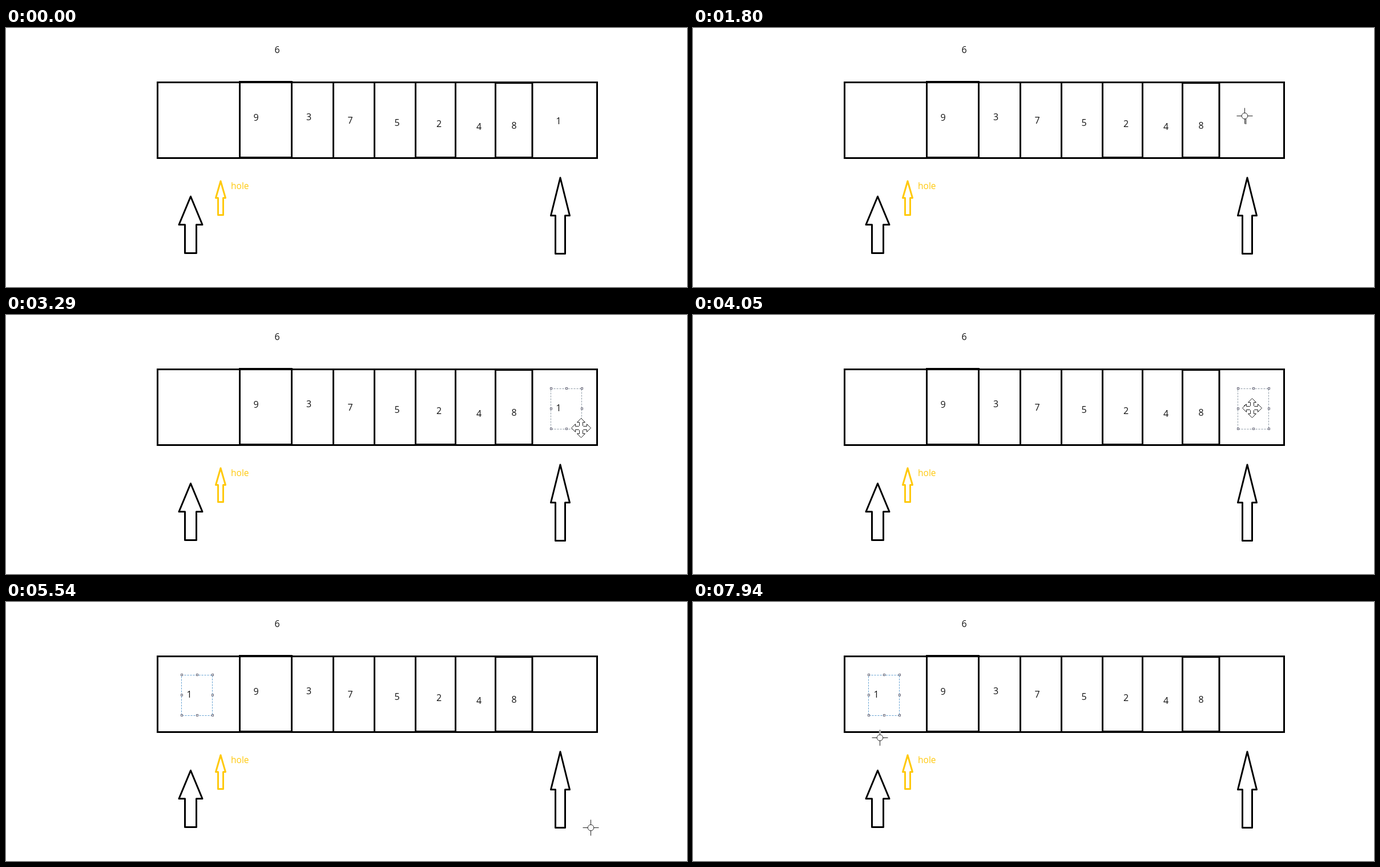
Recreate the animation shown at these times as an HTML page. Size 1193 by 455 pixels, loop 8 s.

```html
<!DOCTYPE html>
<html lang="en">
<head>
<meta charset="utf-8">
<title>Filling the hole</title>
<style>
  html, body { margin: 0; width: 100%; height: 100%; overflow: hidden; background: #fff; }
  svg { display: block; width: 100%; height: 100%; }
  text { font: 16px "Open Sans", "Noto Sans", sans-serif; text-anchor: middle; fill: #111; }
  .ink { fill: none; stroke: #000; stroke-width: 3; stroke-linejoin: round; }
  .thin { fill: #fff; stroke: #222; stroke-width: 1; }
</style>
</head>
<body>
<svg viewBox="0 0 1193 455">
  <g class="ink">
    <g stroke-linejoin="miter">
      <path d="M265.5 95.5H1035.5V228.5H265.5Z"/>
      <path d="M409.5 94.5H500.5V227.5H409.5Z"/>
      <path d="M573.5 95V228M645.5 95V228"/>
      <path d="M717.5 95V227.5H787.5V95"/>
      <path d="M857.5 96.5H922V227.5H857.5Z"/>
    </g>
    <path id="left"/>
    <path id="right"/>
    <path id="hole" stroke="#ffc90e"/>
  </g>
  <g id="digits"></g>
  <text x="394" y="283" style="font-size:15.5px;text-anchor:start;fill:#ffc90e">hole</text>

  <g id="piece">
    <rect id="paper" x="955" y="129" width="54" height="71" fill="#fff"/>
    <text x="968" y="168.7">1</text>
    <rect id="frame" x="954.5" y="129.5" fill="none" stroke-dasharray="3 2"/>
    <g id="handles" fill="#fff" stroke="#667"></g>
  </g>

  <circle id="glow" r="18" fill="#fffb78" style="mix-blend-mode:multiply"/>
  <g id="cross">
    <path id="halo" d="M0-14V14M-14 0H14" stroke="#fff" stroke-width="3"/>
    <circle r="5.3" class="thin"/>
    <path class="thin" d="M0-14V-5M0 5V14M-14 0H-5M5 0H14"/>
  </g>
  <path id="move" class="thin"/>
</svg>
<script>
const LOOP = 8000, STEP = 1000 / 15;
const SEL = { x: 955, y: 129, w: 54, h: 71 };
const GRAB = { x: 979, y: 163 }, DROPPED = { x: 332, y: 162 };
const ENTER = 260, PRESS = 2260, RELEASE = 2990, PICK = 4330, DROP = 5060;

// turning points of the cursor: time, x, y
const PATH = [
  [ENTER, 1023, 432], [1030, 518, 238], [1467, 1022, 200], [1800, 966, 154],
  [2000, 960, 128], [PRESS, 955, 130], [2667, 977, 186], [RELEASE, 1021, 209],
  [3850, 965, 163], [4000, GRAB.x, GRAB.y], [PICK, GRAB.x, GRAB.y],
  [4867, DROPPED.x, DROPPED.y], [5000, DROPPED.x, DROPPED.y],
  [5400, 1077, 414], [5533, 1024, 396], [5860, 1015, 331],
  [6320, 583, 268], [6450, 583, 268], [6733, 299, 255],
  [7067, 939, 307], [7133, 939, 307], [7400, 995, 296], [7933, 327, 238]
];

const $ = id => document.getElementById(id);
const show = (el, on) => el.setAttribute("display", on ? "inline" : "none");
const place = (el, x, y) => el.setAttribute("transform", `translate(${x} ${y})`);
const clamp = (v, max) => Math.max(0, Math.min(max, v));

function arrow(id, cx, top, headW, neck, stemW, bottom) {
  const h = headW / 2, s = stemW / 2;
  $(id).setAttribute("d", `M${cx} ${top}L${cx + h} ${neck}H${cx + s}V${bottom}H${cx - s}V${neck}H${cx - h}Z`);
}
arrow("left", 323.5, 296, 41, 345.5, 20, 395.5);
arrow("right", 971, 263, 33, 329.5, 17, 396.5);
arrow("hole", 376, 269, 17, 298.5, 9, 328.5);

// four-headed arrow: one arm turned by quarters
const arm = [[-3, -4], [-3, -10], [-7, -10], [0, -17], [7, -10], [3, -10], [3, -4]];
let points = [];
for (let i = 0, pts = arm; i < 4; i++, pts = pts.map(([x, y]) => [-y, x])) points.push(...pts);
$("move").setAttribute("d", `M${points.join("L")}Z`);

$("digits").innerHTML = [
  [6, 475, 38], [9, 438, 157], [3, 530.5, 156.5], [7, 603, 162], [5, 685, 166],
  [2, 758.5, 168.5], [4, 828.5, 173.5], [8, 890, 171]
].map(([n, x, y]) => `<text x="${x}" y="${y + 5.7}">${n}</text>`).join("");

for (let i = 0; i < 9; i++) {
  if (i === 4) continue;
  const x = SEL.x + (i % 3) * SEL.w / 2 - 1.5, y = SEL.y + Math.floor(i / 3) * SEL.h / 2 - 1.5;
  $("handles").innerHTML += `<rect x="${x}" y="${y}" width="3" height="3"/>`;
}

function cursorAt(t) {
  let i = 0;
  while (i < PATH.length - 2 && t > PATH[i + 1][0]) i++;
  const [t0, x0, y0] = PATH[i], [t1, x1, y1] = PATH[i + 1];
  const k = clamp((t - t0) / (t1 - t0), 1), e = k * k * (3 - 2 * k);
  return { x: Math.round(x0 + (x1 - x0) * e), y: Math.round(y0 + (y1 - y0) * e) };
}

function draw(time) {
  const t = Math.floor(time / STEP + 0.15) * STEP;
  const c = cursorAt(t);
  const selecting = t >= PRESS && t < RELEASE, selected = t >= RELEASE;
  const lifted = t >= PICK, dragging = lifted && t < DROP;
  const pressed = selecting || dragging;

  const at = !lifted ? GRAB : dragging ? c : DROPPED;
  const dx = at.x - GRAB.x, dy = at.y - GRAB.y;
  place($("piece"), dx, dy);
  show($("paper"), lifted);
  show($("handles"), selected);

  const frame = $("frame");
  show(frame, selecting || selected);
  frame.setAttribute("width", selected ? SEL.w : clamp(c.x - SEL.x, SEL.w));
  frame.setAttribute("height", selected ? SEL.h : clamp(c.y - SEL.y, SEL.h));
  frame.setAttribute("stroke", selecting ? "#222" : lifted ? "#62a0d2" : "#8e9aa6");

  const left = SEL.x + dx, top = SEL.y + dy;
  const inside = selected &&
    c.x > left && c.x < left + SEL.w && c.y > top && c.y < top + SEL.h;
  show($("glow"), pressed);
  show($("halo"), !pressed);
  show($("cross"), t > ENTER && !inside);
  show($("move"), inside);
  for (const id of ["glow", "cross", "move"]) place($(id), c.x + 0.5, c.y + 0.5);
}

const start = performance.now();
function tick() {
  draw((performance.now() - start) % LOOP);
  requestAnimationFrame(tick);
}
tick();
</script>
</body>
</html>
```
